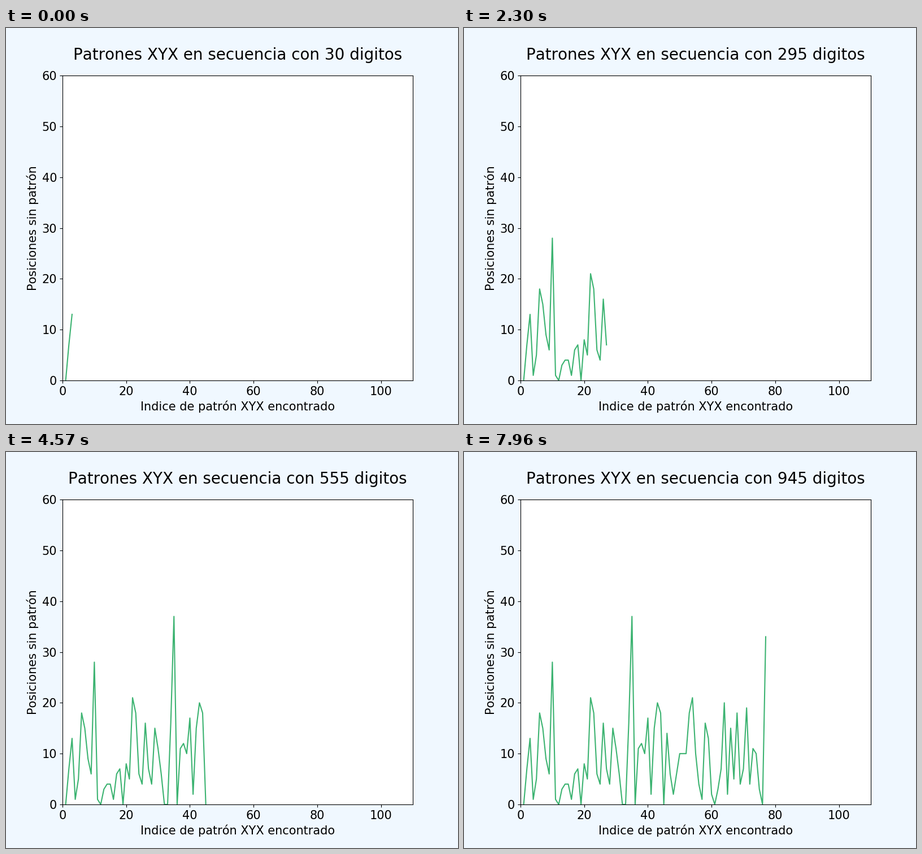
Animation, 800 px wide and 700 px high, one loop 8 s. Source, as a matplotlib script:

```python
import math

import matplotlib.pyplot as plt
import numpy as np
from matplotlib.animation import FuncAnimation

LOOP_MS, TICK_MS = 8000, 20
COUNTS = 184             # digit counts shown in one loop
START, STEP = 30, 5      # first digit count, digits added each time
TOTAL = START + STEP * (COUNTS - 1)


def find_patterns(digits):
    """Gap before, and end of, every separate XYX run in the digits."""
    gaps, ends = [], []
    pos = last = 0
    while pos + 2 < len(digits):
        if digits[pos] == digits[pos + 2]:
            gaps.append(pos - last)
            pos = last = pos + 3
            ends.append(pos)
        else:
            pos += 1
    return np.array(gaps), np.array(ends)


# decimal digits of the square root of two
root = str(math.isqrt(2 * 10 ** (2 * TOTAL)))[:TOTAL]
gaps, ends = find_patterns(root)
index = np.arange(1, len(gaps) + 1)

plt.rcParams.update({"font.family": "DejaVu Sans", "font.size": 15,
                     "text.kerning_factor": 6})
fig, ax = plt.subplots(figsize=(8, 7), dpi=100, facecolor="aliceblue")
ax.set_xlim(0, 110)
ax.set_ylim(0, 60)
ax.set_xlabel("Indice de patrón XYX encontrado")
ax.set_ylabel("Posiciones sin patrón")
title = ax.set_title("", fontsize=20, pad=20)
line, = ax.plot([], [], color="mediumseagreen", lw=1.5)


def update(i):
    # the offset centres each count's change on the tick grid
    step = int(i * TICK_MS * COUNTS / LOOP_MS + 0.4)
    digits = START + STEP * step
    found = np.searchsorted(ends, digits, side="right")
    line.set_data(index[:found], gaps[:found])
    title.set_text(f"Patrones XYX en secuencia con {digits} digitos")
    return line, title


anim = FuncAnimation(fig, update, frames=LOOP_MS // TICK_MS,
                     init_func=lambda: update(0), interval=TICK_MS,
                     repeat=True, repeat_delay=0)
plt.show()
```
